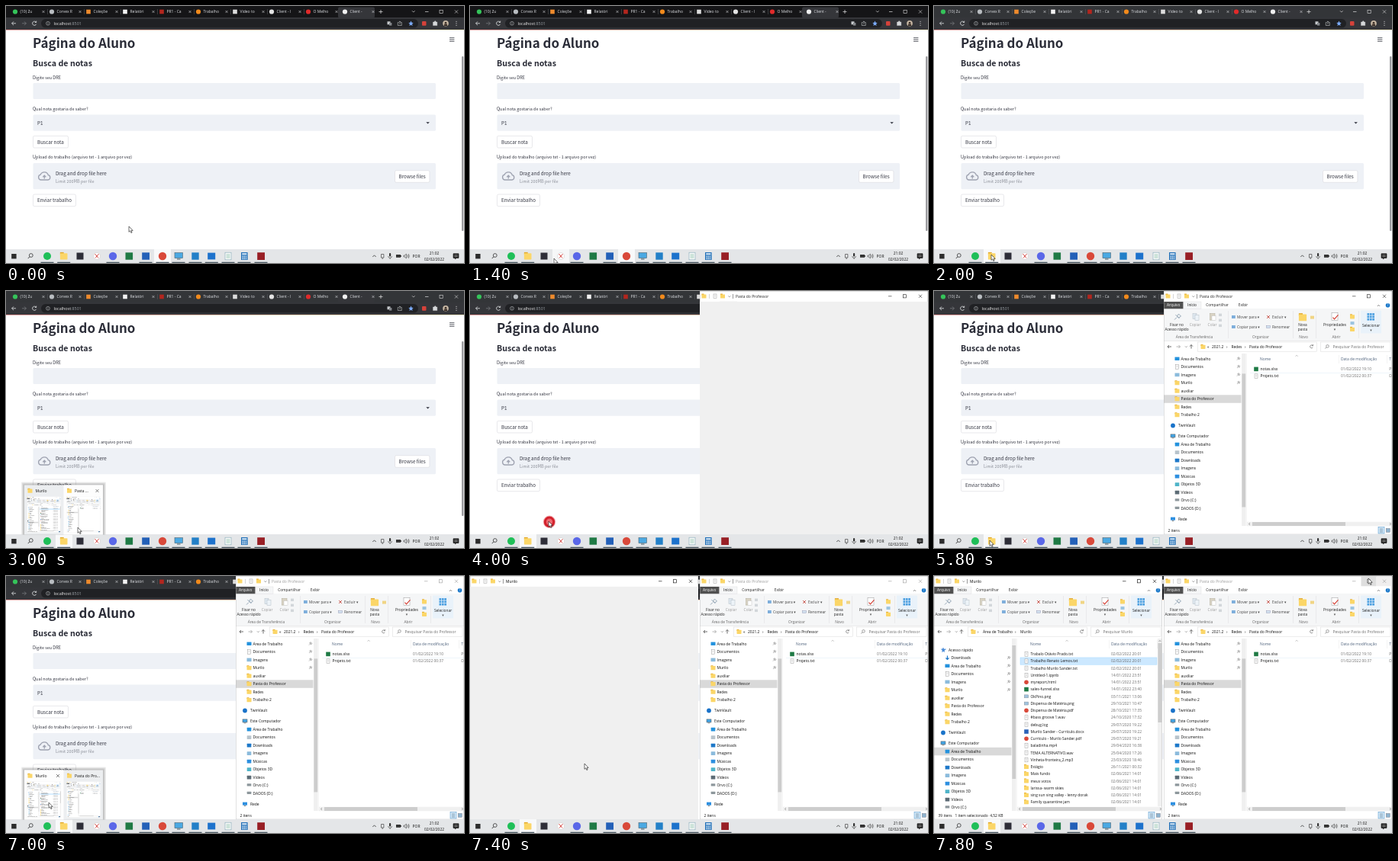
Write an HTML page that moves like this. It is 600 px wide and 337 px high and loops after 8 s.

```html
<!DOCTYPE html>
<html lang="pt">
<head>
<meta charset="utf-8">
<title>Página do Aluno</title>
<style>
html, body { margin: 0; width: 100%; height: 100%; overflow: hidden; background: #fff; }
svg { display: block; width: 600px; height: 337px; }
text { font-family: "Open Sans", "Noto Sans", sans-serif; white-space: pre; }
.page text { font-family: "Noto Sans CJK JP", "Noto Sans CJK SC", "Noto Sans CJK", Lato, sans-serif; }
</style>
</head>
<body>
<svg id="stage" viewBox="0 0 600 337" xmlns="http://www.w3.org/2000/svg"></svg>
<script>
const LOOP = 8000, STEP = 200;
const stage = document.getElementById('stage');

// Drawing helpers, each returns SVG markup
const R = (x, y, w, h, fill, more = '') => `<rect x="${x}" y="${y}" width="${w}" height="${h}" fill="${fill}" ${more}/>`;
const C = (x, y, r, fill, more = '') => `<circle cx="${x}" cy="${y}" r="${r}" fill="${fill}" ${more}/>`;
const L = (d, color, w = .7, fill = 'none') => `<path d="${d}" stroke="${color}" stroke-width="${w}" fill="${fill}"/>`;
const T = (x, y, s, size = 4.95, fill = '#111', more = '') => `<text x="${x}" y="${y}" font-size="${size}" fill="${fill}" ${more}>${s}</text>`;
const M = (x, y, s, size, fill) => T(x, y, s, size, fill, 'text-anchor="middle"');
const G = (id, body, more = '') => `<g id="${id}" ${more}>${body}</g>`;
const cross = (x, y, r, color, w = .6) => L(`M${x - r} ${y - r}l${2 * r} ${2 * r}m0 ${-2 * r}l${-2 * r} ${2 * r}`, color, w);
const folder = (x, y, k = 1) => `<g transform="translate(${x} ${y}) scale(${k})">` +
  R(-3, -3.2, 3, 2, '#e3a92b') + R(-3, -2.4, 6, 5.2, '#fbd668', 'rx=".4"') + '</g>';
const sheet = (x, y) => R(x - 2, y - 2.8, 4, 5.6, '#fff', 'stroke="#9a9a9a" stroke-width=".5"') +
  L(`M${x - 1} ${y - 1}h2m-2 1.4h2`, '#aaa', .4);
const lens = (x, y, r, color) => C(x, y, r, 'none', `stroke="${color}" stroke-width=".8"`) +
  L(`M${x - r * .7} ${y + r * .7}l${-r} ${r}`, color, .9);

// Browser
function browser() {
  const tabs = [
    ['(10) Zu', '#35c45a', 1], ['Corvex R', '#b9bdc1', 1], ['Coleçõe', '#ee8a2c', 0], ['Relatóri', '#f2f2f2', 0],
    ['PR1 - Ca', '#b3261e', 0], ['Trabalho', '#f28a1c', 1], ['Video to', '#dcdcdc', 0], ['Client - l', '#e4e4e4', 1],
    ['O Melho', '#e02a2a', 1], ['Client -', '#f0f0f0', 1]];
  let s = R(0, 0, 600, 15, '#151517', 'id="strip"') + R(435, 1.5, 48, 14, '#35363a', 'rx="2"');
  tabs.forEach(([name, color, round], i) => {
    const x = 12 + 48 * i;
    s += round ? C(x, 7.5, 3.1, color) : R(x - 2.8, 4.7, 5.6, 5.6, color);
    s += T(x + 6.5, 9.3, name, 5, '#dfe1e5') + cross(x + 37, 7.5, 1.5, '#d5d7da');
    if (i < 8) s += R(x + 42.2, 4, .5, 7, '#5a5c60');
  });
  s += L('M488.5 7.5h5m-2.5-2.5v5', '#e8e8e8') + L('M532 6.3l1.8 1.8 1.8-1.8M549 7.5h4.5', '#ddd') +
    R(568, 5.3, 4.2, 4.2, 'none', 'stroke="#ddd" stroke-width=".6"') + cross(590, 7.5, 2.1, '#ddd');
  s += R(0, 15, 600, 16, '#35363a') + R(46, 17, 494, 11.6, '#202124', 'rx="5.8"');
  s += L('M13 22.8h-5.4m2.4-2.4l-2.4 2.4 2.4 2.4', '#e4e6e8', .8) + L('M21 22.8h5.4m-2.4-2.4l2.4 2.4-2.4 2.4', '#77797d', .8) +
    L('M39.3 21.2a2.6 2.6 0 1 0 .3 2.6M39.7 19.6v1.9h-1.9', '#e4e6e8', .8) +
    C(55, 22.8, 2.4, 'none', 'stroke="#b9bcc0" stroke-width=".6"') + L('M55 22.4v1.8M55 21.1v.6', '#b9bcc0', .6);
  s += T(62.5, 24.7, 'localhost<tspan fill="#9aa0a6">:8501</tspan>', 5.4, '#f0f0f0');
  s += R(499.5, 20.3, 4, 4, '#c6c9cc') + R(502, 22, 3.4, 3.6, '#85888c') +
    L('M514.5 21.5h-1.2v4h5v-4h-1.2M516 24v-4m-1.3 1.2l1.3-1.3 1.3 1.3', '#c6c9cc', .6) +
    '<path d="M530.5 19.6l1 2.1 2.2.3-1.6 1.6.4 2.3-2-1.1-2 1.1.4-2.3-1.6-1.6 2.2-.3z" fill="#7baaf7"/>' +
    R(545, 20, 5.5, 5.8, '#d6423a', 'rx="1"') + L('M559.5 21h1.8c-.5-1.8 2.3-1.8 1.8 0h1.7v4.6h-5.3z', '#d6d8da', .4, '#d6d8da') +
    C(576, 22.8, 3.8, '#c9b9a5') + C(576, 22.2, 1.4, '#3c3029') + R(574, 23.7, 4, 2.4, '#3c3029') +
    [20.3, 22.8, 25.3].map(y => C(590, y, .6, '#e0e0e0')).join('');
  return s;
}

// Web page
function page() {
  const ink = '#31333f', field = '#eef1f6';
  const button = (x, y, w, s) => R(x, y, w, 15.6, '#fff', 'rx="1.8" stroke="#d8d9dd" stroke-width=".6"') + M(x + w / 2, y + 10.4, s, 6.3, ink);
  return R(0, 30, 600, 290, '#fff') + R(0, 31, 600, 1, 'url(#deco)', 'opacity=".55"') +
    T(35, 54.9, 'Página do Aluno', 16.95, '#2b2d38', 'font-weight="700"') +
    T(35, 78.6, 'Busca de notas', 10.65, '#2b2d38', 'font-weight="700"') +
    T(35, 95.6, 'Digite seu DRE', 5.5, ink) + R(35.5, 101, 527.5, 21, field, 'rx="1.5"') +
    T(35, 137, 'Qual nota gostaria de saber?', 5.5, ink) + R(35.5, 142.5, 527.5, 21.3, field, 'rx="1.5"') +
    T(41, 156.2, 'P1', 6.3, ink) + '<path d="M550.3 152.2h4.6l-2.3 2.4z" fill="#31333f"/>' +
    button(35.5, 170.4, 46, 'Buscar nota') +
    T(35, 200.3, 'Upload do trabalho (arquivo txt - 1 arquivo por vez)', 5.5, ink) + R(35.5, 206, 527.5, 34.3, field, 'rx="1.5"') +
    L('M46 228h9a3.2 3.2 0 0 0 .3-6.3a5.3 5.3 0 0 0-10-.6a3.5 3.5 0 0 0 .7 6.9zM50.3 226.4v-4m-2 1.8l2-2 2 2', '#9ea2b0', 1.3) +
    T(65, 221.6, 'Drag and drop file here', 6.3, ink) + T(65, 231.6, 'Limit 200MB per file', 5.5, '#8d9099') +
    button(509.5, 215.7, 45.4, 'Browse files') + button(35.5, 247, 56, 'Enviar trabalho') +
    L('M581 41.7h6.4m-6.4 2.3h6.4m-6.4 2.3h6.4', '#4a4c55', .9) + R(597, 66, 2.4, 229, '#9b9b9f', 'rx="1"');
}

// File manager window in local coordinates, 299 wide
const QUICK = ['Downloads', 'Área de Trabalho', 'Documentos', 'Imagens', 'Murilo', 'auxiliar', 'Pasta do Professor', 'Redes', 'Trabalho 2'];
const COMPUTER = ['Área de Trabalho', 'Documentos', 'Downloads', 'Imagens', 'Músicas', 'Objetos 3D', 'Vídeos', 'Orvo (C:)', 'DADOS (D:)'];

function fileIcon(name, x, y) {
  const ext = (name.match(/\.(\w+)$/) || [])[1];
  if (!ext) return folder(x, y);
  if (ext == 'xlsx') return R(x - 2.8, y - 2.8, 5.6, 5.6, '#1f7a45');
  if (ext == 'docx') return R(x - 2.8, y - 2.8, 5.6, 5.6, '#2b62b8');
  if (ext == 'html' || ext == 'pdf') return C(x, y, 2.8, '#d9493a');
  if (ext == 'png') return R(x - 2.8, y - 2, 5.6, 4, '#9fc3df', 'stroke="#888" stroke-width=".4"');
  return sheet(x, y);
}

function navPane({ id, navTop, quickPick, computerPick }) {
  const row = 10.5;
  let y = navTop, s = '';
  const line = (name, x, icon, on) => {
    if (on) s += R(0, y - 5.2, 101.5, row, '#d9d9d9');
    s += icon + T(x, y + 1.8, name);
    y += row;
  };
  line('Acesso rápido', 19, L(`M9.5 ${y - 1}h6l-4.8 3.6 1.3-5.4 1.7 5.4z`, '#3a7fd0', .6, '#5a9ee6'));
  QUICK.forEach((name, i) => {
    const icon = i == 0 ? L(`M17.5 ${y - 3}v5m-2-2l2 2 2-2`, '#1d78c9', 1.2) :
      i == 1 ? R(14.5, y - 2.4, 6, 4.4, '#2492dd') : i == 2 ? sheet(17.5, y) :
      i == 3 ? R(14.5, y - 2.4, 6, 4.6, '#8bbbdc') : folder(17.5, y);
    if (i < 5) s += L(`M96 ${y + 1.5}l1.5-1.5m-.8-1.6l2.4 2.4m-1-3.2l1.8 1.8-1.4 1-1.2-1.2z`, '#777', .6);
    line(name, 22.5, icon, name == quickPick);
  });
  y += 3.5;
  line('TwinVault', 19, C(12, y, 2.9, '#1a73c9'));
  y += 3.5;
  line('Este Computador', 19, R(9, y - 2.6, 6, 4, '#43a4e4', 'stroke="#555" stroke-width=".5"') + R(10.5, y + 2, 3, .7, '#555'));
  const tints = ['#2492dd', '#b8c4cc', '#1d78c9', '#8bbbdc', '#2d8fe0', '#4fb4c9', '#5c6b75', '#8d979c', '#8d979c'];
  COMPUTER.forEach((name, i) => line(name, 22.5, R(14.7, y - 2.3, 5.6, i > 6 ? 3.2 : 4.8, tints[i], 'rx=".5"'), name == computerPick));
  y += 3.5;
  line('Rede', 19, R(9, y - 2.4, 6, 4, '#2d8fe0') + R(11, y + 1.8, 2, 1, '#666'));
  const thumbTop = 91 + (97 - navTop) * .6;
  return `<clipPath id="clip-${id}"><rect x="0" y="82" width="108" height="226"/></clipPath><g clip-path="url(#clip-${id})">${s}</g>` +
    R(102, 82, 5.6, 226, '#f0f0f0') + R(102.4, thumbTop, 4.8, 175, '#cdcdcd') + R(108.3, 82, .5, 226, '#ececec');
}

function ribbon() {
  const mid = (x, y, s, c) => M(x, y + 1.7, s, 4.8, c);
  const soft = '#666', dim = '#9a9a9a';
  let s = R(0, 23, 299, 42.5, '#f5f6f7') + R(0, 65.3, 299, .5, '#dadbdc');
  s += R(0, 14, 25.5, 9.3, '#505050') + mid(12.7, 18.7, 'Arquivo', '#fff') +
    R(26, 14, 23, 9.5, '#f5f6f7', 'stroke="#dadbdc" stroke-width=".4"') +
    mid(37, 18.7, 'Início', '#111') + mid(70, 18.7, 'Compartilhar', '#222') + mid(104, 18.7, 'Exibir', '#222');
  s += L('M280 20l1.6-1.6 1.6 1.6', '#555') + C(293.5, 18.7, 2.8, '#1a78c9') + M(293.5, 20.4, '?', 4.5, '#fff');
  [84.5, 169, 199, 255].forEach(x => s += R(x, 26, .5, 36, '#dcdddf'));
  s += R(258, 25.5, 27, 30, '#e9f2fa', 'rx=".5"');

  let icons = L('M14 36l3-3m-1.5-3.5l5 5m-1-6l3 3-3 2-2-2z', '#8da0b0', .9) +
    R(38, 28, 5, 7, '#dfe8f0', 'stroke="#b5bec6" stroke-width=".5"') + R(41, 30, 5, 7, '#edf3f8', 'stroke="#b5bec6" stroke-width=".5"') +
    R(60.5, 28, 6.5, 8.5, '#d9d3c4', 'stroke="#b0a995" stroke-width=".5"') + R(63, 31, 5, 6, '#fff', 'stroke="#bbb" stroke-width=".4"') +
    [28, 35, 42].map(y => R(72, y, 4, 3.5, '#d2d6da')).join('') +
    folder(182, 33, 1.7) + R(192, 31, 5, 4, '#f0d585') +
    R(220, 27, 8, 10, '#fff', 'stroke="#999" stroke-width=".5"') + L('M221.5 33l2 2.3 5-5.5', '#d33a2f', 1.1) +
    folder(247, 32) + R(244.5, 38.5, 5, 4, '#9cc4e0') + folder(247, 48.5);
  for (let i = 0; i < 9; i++) icons += R(266.5 + i % 3 * 3.4, 27.5 + Math.floor(i / 3) * 3.4, 2.7, 2.7, '#4b9fe0');
  s += `<g transform="translate(0 1.6)">${icons}</g>`;

  s += mid(17, 44, 'Fixar no', '#222') + mid(17, 50, 'Acesso rápido', '#222') + mid(41, 44, 'Copiar', dim) + mid(63.5, 44, 'Colar', dim) +
    mid(40, 60, 'Área de Transferência', soft);
  s += R(89, 32, 4.8, 4, '#7eaedb') + T(96, 35.7, 'Mover para ▾', 4.8, '#444') +
    R(89, 45, 4.8, 4, '#7eaedb') + T(96, 48.7, 'Copiar para ▾', 4.8, '#444') +
    cross(137, 34, 1.9, '#c95a52', 1) + T(142, 35.7, 'Excluir ▾', 4.8, '#444') +
    R(134.5, 45.5, 5, 3, '#d2e2f0', 'stroke="#88a" stroke-width=".4"') + T(142, 48.7, 'Renomear', 4.8, '#444') + mid(127, 60, 'Organizar', soft);
  return s + mid(182, 44, 'Nova', '#222') + mid(182, 50, 'pasta', '#222') + mid(183, 60, 'Novo', soft) +
    mid(224, 44, 'Propriedades', '#222') + mid(224, 50, '▾', '#555') + mid(226, 60, 'Abrir', soft) +
    mid(271.5, 45, 'Selecionar', '#222') + mid(271.5, 51, '▾', '#555');
}

function fileWindow(o) {
  const thin = 'stroke="#d9d9d9" stroke-width=".5"', slate = '#4c607a', grey = '#6d6d6d';
  const long = o.files.length > 20;
  let s = R(0, 0, 299, 319, '#fff') + folder(5.5, 6.8) + R(12.3, 4, .5, 6, '#aaa') + sheet(20, 6.8) + folder(30, 6.8) +
    L('M37.4 6.5l1.4 1.4 1.4-1.4M43.5 4v6', '#555', .6) + T(47, 8.6, o.title, 4.95, 'currentColor') +
    L('M247 6.8h4.5', 'currentColor', .6) + R(266.4, 4.7, 4.2, 4.2, 'none', 'stroke="currentColor" stroke-width=".6"') +
    cross(289, 6.8, 2.1, 'currentColor') + ribbon();
  s += L('M10 73h-5m2-2l-2 2 2 2', '#333') + L('M16.5 73h5m-2-2l2 2-2 2', '#999') + L('M28 72.4l1.4 1.4 1.4-1.4', '#777') +
    L('M36 75.6v-5m-2 2l2-2 2 2', '#333') +
    R(44.5, 67, 156, 12.2, '#fff', thin) + folder(51.5, 73.2) + R(205.5, 67, 91.5, 12.2, '#fff', thin) +
    lens(214.5, 72.4, 1.8, '#888') + T(221.5, 74.9, 'Pesquisar ' + o.title, 4.95, grey) +
    L('M195.2 71.6a2 2 0 1 0 .1 2.4M195.5 70v1.8h-1.7', '#555', .6) + o.crumbs.map(([x, t]) => T(x, 74.9, t)).join('');
  s += navPane(o);
  s += T(126, 91, 'Nome', 4.95, slate) + T(232, 91, 'Data de modificação', 4.95, slate) +
    R(229, 84, .4, 11, '#e2e2e2') + R(292, 84, .4, 11, '#e2e2e2') + L('M172.5 85.6l1.6-1.3 1.6 1.3', '#888', .5);
  o.files.forEach((entry, i) => {
    const [name, date, kind] = entry.split('|'), y = 102.4 + 9.24 * i;
    if (i == o.selected) s += R(113, y - 4.7, 179, 9.3, '#cce8ff', 'stroke="#99d1ff" stroke-width=".4"');
    s += fileIcon(name, 121, y) + T(126.5, y + 1.8, name) + T(232, y + 1.8, date, 4.95, grey);
    if (kind) s += T(295.3, y + 1.8, kind, 4.95, grey);
  });
  s += long ? R(293, 82, 5.8, 220, '#f0f0f0') + R(293.4, 88, 5, 104, '#cdcdcd') + L('M294.5 86l1.4-1.5 1.4 1.5', '#666', .6) :
    T(295.3, 91, 'T', 4.95, slate) + R(113, 107, 186, .4, '#d5e6f3');
  s += R(109, 302.7, 190, 5.6, '#f0f0f0') + R(116, 303, 122, 5, '#cdcdcd') + L('M113 304l-1.5 1.5 1.5 1.5M296 304l1.5 1.5-1.5 1.5', '#666', .6);
  s += T(5.5, 315.5, o.status) + R(281, 309.6, 8, 8.4, '#cfe6f7', 'stroke="#4a90c8" stroke-width=".5"') +
    L('M283 312h4m-4 2h4m-4 2h4', '#56748c', .6) + R(291.3, 311.4, 5, 4.8, '#8fb4cf', 'stroke="#667" stroke-width=".4"');
  return G(o.id, s + R(.2, .2, 298.6, 318.8, 'none', 'stroke="#b4b4b4" stroke-width=".4"'));
}

const teacher = {
  id: 'teacher', title: 'Pasta do Professor', navTop: 68, quickPick: 'Pasta do Professor', status: '2 itens',
  crumbs: [[57, '«'], [63, '2021.2'], [82, '›'], [88.5, 'Redes'], [106, '›'], [112, 'Pasta do Professor']],
  files: ['notas.xlsx|01/02/2022 19:10|P', 'Projeto.txt|01/02/2022 00:37|D']
};
const student = {
  id: 'student', title: 'Murilo', navTop: 97, computerPick: 'Área de Trabalho', selected: 1,
  status: '39 itens   1 item selecionado  4,52 KB',
  crumbs: [[57, '›'], [64, 'Área de Trabalho'], [106, '›'], [113, 'Murilo']],
  files: ['Trabalo Otávio Prado.txt|02/02/2022 20:01', 'Trabalho Renato Lemos.txt|02/02/2022 20:01',
    'Trabalho Murilo Sander.txt|02/02/2022 20:01', 'Untitled-1.ipynb|14/01/2022 23:51', 'myreport.html|14/01/2022 23:51',
    'sales-funnel.xlsx|14/01/2022 23:40', 'OkPino.png|03/11/2021 13:06', 'Dispensa de Matéria.png|29/10/2021 10:47',
    'Dispensa de Matéria.pdf|28/10/2021 17:35', '#bass groove 1.wav|24/10/2020 17:32', 'debug.log|29/07/2020 19:22',
    'Murilo Sander - Currículo.docx|29/07/2020 19:22', 'Currículo - Murilo Sander.pdf|29/07/2020 19:21',
    'baladinha.mp4|29/04/2020 16:38', 'TEMA ALTERNATIVO.wav|25/04/2020 17:26', 'Vinheta-fronteira_2.mp3|23/03/2020 18:46',
    'Estágio|26/11/2021 00:32', 'Mais fundo|02/06/2021 14:01', 'meus votos|02/06/2021 14:01',
    'larissa- warm skies|02/06/2021 14:01', 'sing sun sing valley - lenny dorak|02/06/2021 14:01', 'Family quarantine jam|02/06/2021 14:01']
};

// Taskbar
function taskbar() {
  let s = R(0, 319, 600, 18, '#e4e6e8') + R(194, 319, 22, 18, '#f8f9fa', 'id="webKey"') +
    R(65, 319, 22, 18, '#f8f9fa', 'id="dirKey"') + R(108, 319, 22, 18, '#f6f7f8', 'id="snipKey"');
  s += R(7.2, 325, 6.4, 6.4, '#2c2c2c') + lens(32.8, 327, 2.4, '#333') + C(54, 328, 5, '#1fbf58') + folder(75.7, 328, 1.6) +
    R(92.5, 323.5, 9, 9, '#2e2e38') + C(119, 328, 4.6, '#fff', 'stroke="#c8c8c8" stroke-width=".5"') +
    L('M116.5 325l4.5 5.5m.5-5.5l-4.5 5.5', '#d6504c', 1) + C(140, 328, 5.2, '#5a67e8') +
    R(156.5, 323.3, 9.6, 9.4, '#1f7a45') + R(178.2, 323.3, 9.8, 9.4, '#2360b8') + C(205, 328, 5.2, '#d9493a') +
    R(221, 323.6, 10.4, 7, '#4ba9e2', 'stroke="#47606f" stroke-width=".6"') + R(224, 331.5, 4.5, 1, '#47606f') +
    R(243.3, 323.3, 9.4, 9.4, '#2380c8') + R(264.2, 323.6, 10, 8.8, '#1d72cc') +
    R(287, 323.2, 8, 9.6, '#fafafa', 'stroke="#81a9b5" stroke-width=".6"') + L('M288.5 326h5m-5 2h5m-5 2h5', '#5fae8c', .6) +
    R(308, 323, 8.6, 10, '#2471b8') + R(309.2, 324.2, 6.2, 2, '#dceaf5');
  for (let i = 0; i < 9; i++) s += R(309.3 + i % 3 * 2.2, 327.4 + Math.floor(i / 3) * 1.8, 1.5, 1.2, '#e5f0f8');
  s += R(329.2, 323.2, 9.8, 9.8, '#981f25');
  [54, 75.7, 140, 183, 205, 226, 248, 269.3, 291, 312, 334].forEach(x => s += R(x - 8.5, 335.7, 17, 1.3, '#4c5a64'));
  s += L('M480.3 329l2.2-2.2 2.2 2.2', '#333', .8) + L('M491.5 325.5h3.4v4.5h-3.4zM493.2 330v2', '#444', .7) +
    R(502, 324, 2.2, 4.6, '#333', 'rx="1"') + L('M500.7 328a2.4 2.4 0 0 0 4.8 0m-2.4 2.4v1.6', '#333', .6) +
    R(511, 326, 6, 3.8, '#333') + R(517, 327, .9, 1.8, '#333') +
    L('M521 327h1.4l2-1.8v5.6l-2-1.8h-1.4zM526 326.2q1.3 1.8 0 3.6m1.3-4.6q2 2.8 0 5.6', '#333', .6) +
    T(532.6, 329.8, 'POR') + M(561, 325.9, '21:02', 4.9, '#111') + M(561, 333.9, '02/02/2022', 4.9, '#111') +
    L('M586 324.8h7v5.6h-3l-1.6 1.6v-1.6h-2.4z', '#222', .7, '#222') + L('M587.3 326.8h4.4m-4.4 1.6h4.4', '#ddd', .5);
  return s;
}

// Window previews above the taskbar
function preview() {
  const thumb = (x, id) => `<use href="#${id}" transform="translate(${x} 269.5) scale(.148)"/>`;
  const shadow = [4, 3, 2, 1].map(d => R(24 - d, 254.5 - d, 103 + 2 * d, 65 + d, '#000', 'opacity=".07" rx="1"')).join('');
  return shadow + R(24, 254.5, 103, 65, '#eceef0') +
    R(24, 254.5, 51.5, 65, '#fdfdfd', 'id="hotA"') + R(75.5, 254.5, 51.5, 65, '#fdfdfd', 'id="hotB"') +
    folder(31.5, 262) + T(38.5, 263.9, 'Murilo') + folder(83, 262) + T(90, 263.9, 'Pasta ...', 4.95, '#111', 'id="nameB"') +
    G('closeA', cross(68, 262, 2, '#333')) + G('closeB', cross(119.5, 262, 2, '#333')) + thumb(27.5, 'student') + thumb(79.5, 'teacher');
}

const blank = id => R(0, 14, 299, 305, '#f0f0f0', `id="${id}"`);
stage.innerHTML =
  '<defs><linearGradient id="deco"><stop stop-color="#ff5b5b"/><stop offset="1" stop-color="#fff3a0"/></linearGradient></defs>' +
  G('web', page(), 'class="page"') + browser() +
  G('right', fileWindow(teacher) + blank('rightBlank'), 'transform="translate(301 0)"') +
  G('left', fileWindow(student) + blank('leftBlank')) +
  G('maxKey', R(559.5, .5, 20, 12.8, '#dedede') + R(580, .5, 19.5, 12.8, '#f0eeee') +
    R(567.4, 4.7, 4.2, 4.2, 'none', 'stroke="#777" stroke-width=".6"') + cross(590, 6.8, 2.1, '#999')) +
  taskbar() + G('preview', preview()) +
  G('ring', C(0, 0, 8.2, '#e0303a', 'opacity=".4"') + C(0, 0, 7.2, '#d3212c') + C(0, 0, 4.2, '#ec6a70')) +
  G('pointer', L('M0 0V7.3L1.7 5.8 2.9 8.5 4.1 8 3 5.4H5.2Z', '#111', .6, '#fff'));

// Pointer tip: time, x, y
const path = [
  [0, 161, 289], [1000, 150, 302], [1200, 126, 322], [1400, 110, 331], [1600, 86, 329], [1800, 77, 327], [2000, 75, 326],
  [2200, 76, 325], [2600, 83, 319], [2800, 91, 313], [3000, 94, 310], [3400, 99, 306], [3600, 103, 302],
  [4600, 200, 262], [4800, 372, 178], [5000, 442, 145], [5200, 340, 206], [5400, 152, 298], [5600, 73, 327],
  [6200, 71, 322], [6400, 64, 311], [6600, 58, 301], [6800, 56, 297],
  [7400, 150, 246], [7600, 380, 116], [7800, 569, 3]];
const el = id => document.getElementById(id);
const show = (id, on) => el(id).style.display = on ? '' : 'none';
const within = (t, a, b) => t >= a && t < b;

function draw(t) {
  const focused = t < 1800, onSecond = within(t, 2600, 5000);
  const [, x, y] = path.filter(p => p[0] <= t).pop();
  el('pointer').setAttribute('transform', `translate(${x} ${y})`);
  el('ring').setAttribute('transform', `translate(${x + 1} ${y + .8})`);
  show('ring', within(t, 3800, 4200) || within(t, 7200, 7400));
  el('strip').setAttribute('fill', focused ? '#151517' : '#333538');
  show('webKey', focused);
  show('dirKey', t >= 1600);
  show('snipKey', within(t, 1400, 1600));
  show('preview', within(t, 2200, 3800) || within(t, 6000, 7400));
  show('hotA', t >= 6400);
  show('closeA', t >= 6400);
  show('hotB', onSecond);
  show('closeB', onSecond);
  el('nameB').textContent = onSecond ? 'Pasta ...' : 'Pasta do Pro...';
  show('right', t >= 3800);
  show('rightBlank', t < 4200);
  el('right').style.color = t < 6000 ? '#222' : '#9a9a9a';
  show('left', t >= 7400);
  show('leftBlank', t < 7600);
  show('maxKey', t >= 7800);
}

const start = performance.now();
function tick() {
  const t = (performance.now() - start) % LOOP;
  draw(Math.floor(t / STEP) * STEP);
  requestAnimationFrame(tick);
}
tick();
</script>
</body>
</html>
```
